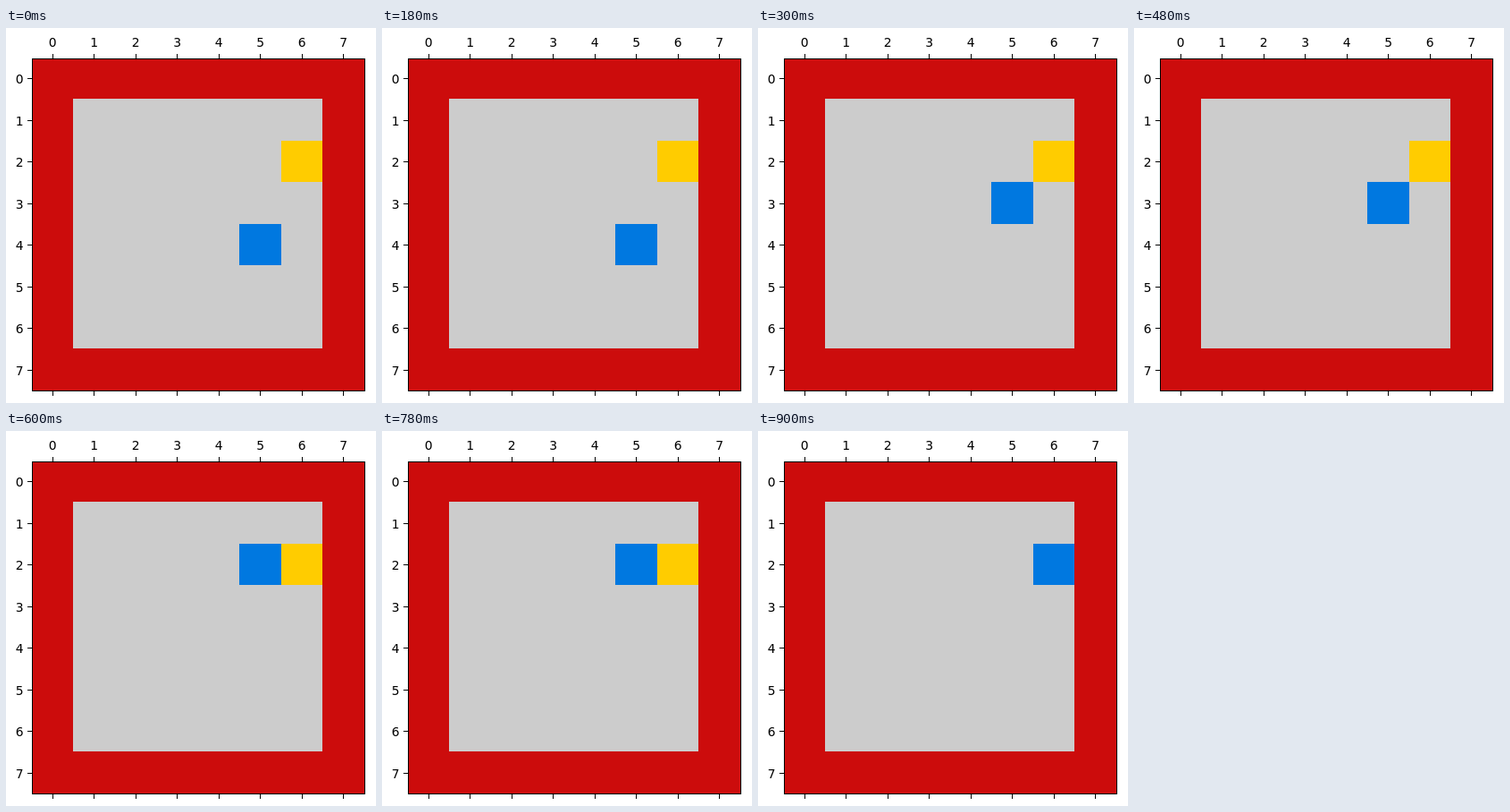
Recreate the animation shown at these times as an HTML page. Size 414x419 px, loop 1.2 s.

```html
<!DOCTYPE html>
<html lang="en">
<head>
<meta charset="utf-8">
<title>Grid walk</title>
<style>
  html, body { margin: 0; width: 100%; height: 100%; overflow: hidden; background: #fff; }
  svg { display: block; }
  text { font: 13.89px "DejaVu Sans", sans-serif; fill: #000; }
</style>
</head>
<body>
<svg id="stage" width="414" height="419" viewBox="0 0 414 419"></svg>
<script>
const LEFT = 29, TOP = 33, CELL = 46.5, COUNT = 8;
const STEP_MS = 300;
const PATH = [[5, 4], [5, 3], [5, 2], [6, 2]];
const GOAL = [6, 2];
const stage = document.getElementById("stage");

function add(tag, attrs, text = "") {
  const node = document.createElementNS("http://www.w3.org/2000/svg", tag);
  for (const key in attrs) node.setAttribute(key, attrs[key]);
  node.textContent = text;
  return stage.appendChild(node);
}

const rect = (x, y, width, height, fill) => add("rect", { x, y, width, height, fill });
const edgeX = col => Math.floor(LEFT + col * CELL);
const edgeY = row => Math.floor(TOP + row * CELL);

// Cell edges snap to whole pixels.
function place(node, col, row, span = 1) {
  const x = edgeX(col), y = edgeY(row);
  node.setAttribute("x", x);
  node.setAttribute("y", y);
  node.setAttribute("width", edgeX(col + span) - x);
  node.setAttribute("height", edgeY(row + span) - y);
}

function block(fill, col, row, span) {
  const node = add("rect", { fill });
  place(node, col, row, span);
  return node;
}

rect(29, 34, 372, 371, "#cc0c0c");
block("#cccccc", 1, 1, 6);
block("#ffcc00", ...GOAL);
const walker = block("#0078e0", ...PATH[0]);

rect(29, 34, 1, 372, "#000");
rect(401, 34, 1, 372, "#000");
rect(29, 34, 373, 1, "#000");
rect(29, 405, 373, 1, "#000");

for (let i = 0; i < COUNT; i++) {
  const x = LEFT + (i + 0.5) * CELL, y = TOP + 0.5 + (i + 0.5) * CELL;
  rect(Math.floor(x), 29, 1, 5, "#000");
  rect(Math.floor(x), 406, 1, 5, "#000");
  rect(24, Math.floor(y), 5, 1, "#000");
  add("text", { x: x, y: 21, "text-anchor": "middle" }, i);
  add("text", { x: 19.5, y: Math.floor(y) + 6, "text-anchor": "end" }, i);
}

function draw(time) {
  const step = Math.floor(time / STEP_MS) % PATH.length;
  place(walker, ...PATH[step]);
}

function tick(now) {
  draw(now);
  requestAnimationFrame(tick);
}
draw(0);
requestAnimationFrame(tick);
</script>
</body>
</html>
```
